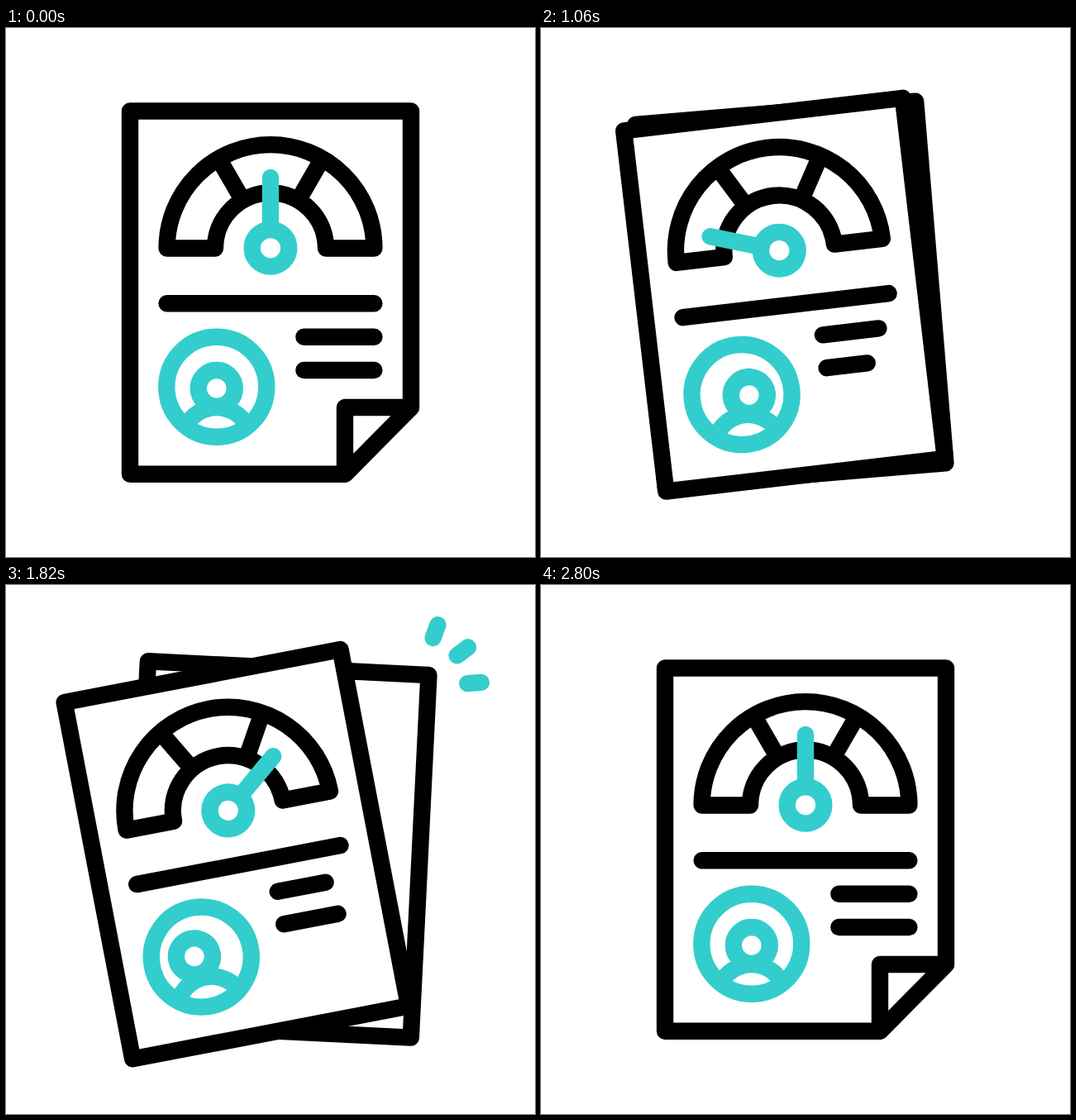
An HTML page for the animation above (3000 ms loop, 640 by 640 pixels).

```html
<!DOCTYPE html>
<html lang="en">
<head>
<meta charset="utf-8">
<title>Report</title>
<style>
  html, body { margin: 0; width: 100%; height: 100%; overflow: hidden; background: #fff; }
  svg { display: block; width: 100vw; height: 100vh; }
  svg * { fill: none; stroke-width: 20.4; stroke-linejoin: round; }
  .ink { stroke: #000; }
  .teal { stroke: #33cdcd; }
  .round { stroke-linecap: round; }
  .sheet { fill: #fff; }
</style>
</head>
<body>
<svg viewBox="0 0 640 640">
  <path id="back" class="ink sheet" d="M150 100.5H490V539.7H150Z"/>
  <g id="front">
    <path id="page" class="ink sheet"/>
    <path id="fold" class="ink sheet"/>
    <path class="ink" d="M194.6 266.5A125.4 125.4 0 0 1 445.4 266.5H387A67 67 0 0 0 253 266.5Z"/>
    <path class="ink" d="M286.5 208.5L257.3 158M353.5 208.5L382.7 158"/>
    <path class="ink round" d="M194.6 333.2H445.4"/>
    <path id="line1" class="ink round"/>
    <path id="line2" class="ink round"/>
    <circle class="teal" cx="254.8" cy="434.2" r="60.5"/>
    <path class="teal" d="M217.7 481.8A41.6 41.6 0 0 1 291.9 481.8"/>
    <circle id="head" class="teal" r="22"/>
    <g id="needle">
      <path class="teal round" d="M320 244V181"/>
      <circle class="teal" cx="320" cy="266.3" r="22.3"/>
    </g>
  </g>
  <path id="sparks" class="teal round"/>
</svg>
<script>
  const LOOP = 3000;
  const set = (id, name, value) => document.getElementById(id).setAttribute(name, value);

  // Smooth step from 0 to 1 between two times.
  function ease(t, from, to) {
    const u = Math.min(1, Math.max(0, (t - from) / (to - from)));
    return u * u * (3 - 2 * u);
  }

  // Line length: two dips in a row, the second one shallower.
  function lineLength(t, start) {
    const u = (t - start) / 1010;
    if (u < 0 || u > 2) return 85;
    const depth = u < 1 ? 37 : 26;
    return 85 - depth * (1 - Math.cos(2 * Math.PI * u)) / 2;
  }

  function drawSheets(t) {
    const tilt = -5.65 * ease(t, 540, 750);
    const home = 1 - ease(t, 1900, 2170);
    const front = (tilt - 5.25 * ease(t, 730, 1900)) * home;
    const back = (tilt + 8.6 * ease(t, 850, 1895)) * home;
    set('front', 'transform', `rotate(${front} 329 539.7)`);
    set('back', 'transform', `rotate(${back} 329 539.7)`);
    set('back', 'visibility', t > 850 && t < 2170 ? 'visible' : 'hidden');
  }

  function drawCorner(open) {
    const tip = `${410 + 80 * open} ${459 + 80.7 * open}`;
    const flipped = open > 0.5;
    set('page', 'd', `M150 100.5H490V459${flipped ? 'L' + tip : ''}L410 539.7H150Z`);
    set('fold', 'd', flipped ? '' : `M490 459L${tip}L410 539.7Z`);
  }

  // Needle and head share the beat: left/right, right/left, up, rest.
  function drawGauge(t) {
    const swing = ease(t, 220, 840), cross = ease(t, 865, 1660);
    const lift = ease(t, 1660, 2200), rest = ease(t, 2200, 2800);
    const angle = -93 * swing + 139 * cross + 21 * lift - 67 * rest;
    set('needle', 'transform', `rotate(${angle} 320 266.3)`);
    set('head', 'cx', 254.8 + 12 * swing - 22.3 * cross + 10.3 * lift);
    set('head', 'cy', 436 - 1.5 * cross - 11.5 * lift + 13 * rest);
  }

  // Three rays fan out from the sheet's corner.
  function drawSparks(t) {
    const head = ease(t, 1620, 1960), tail = ease(t, 1690, 2040);
    let path = '';
    for (let i = 0; i < 3 && head - tail > 0.01; i++) {
      const a = (33 * i - 70) * Math.PI / 180;
      const point = s => `${495 + (47 + 52 * s) * Math.cos(a)} ${123.5 + (47 + 52 * s) * Math.sin(a)}`;
      path += `M${point(tail)}L${point(head)}`;
    }
    set('sparks', 'd', path);
  }

  function draw(t) {
    drawSheets(t);
    drawCorner(ease(t, 220, 845) - ease(t, 2160, 2800));
    drawGauge(t);
    set('line1', 'd', `M360.4 373.8h${lineLength(t, 290)}`);
    set('line2', 'd', `M360.4 414h${lineLength(t, 490)}`);
    drawSparks(t);
  }

  const start = performance.now();
  function tick() {
    draw((performance.now() - start) % LOOP);
    requestAnimationFrame(tick);
  }
  tick();
</script>
</body>
</html>
```
